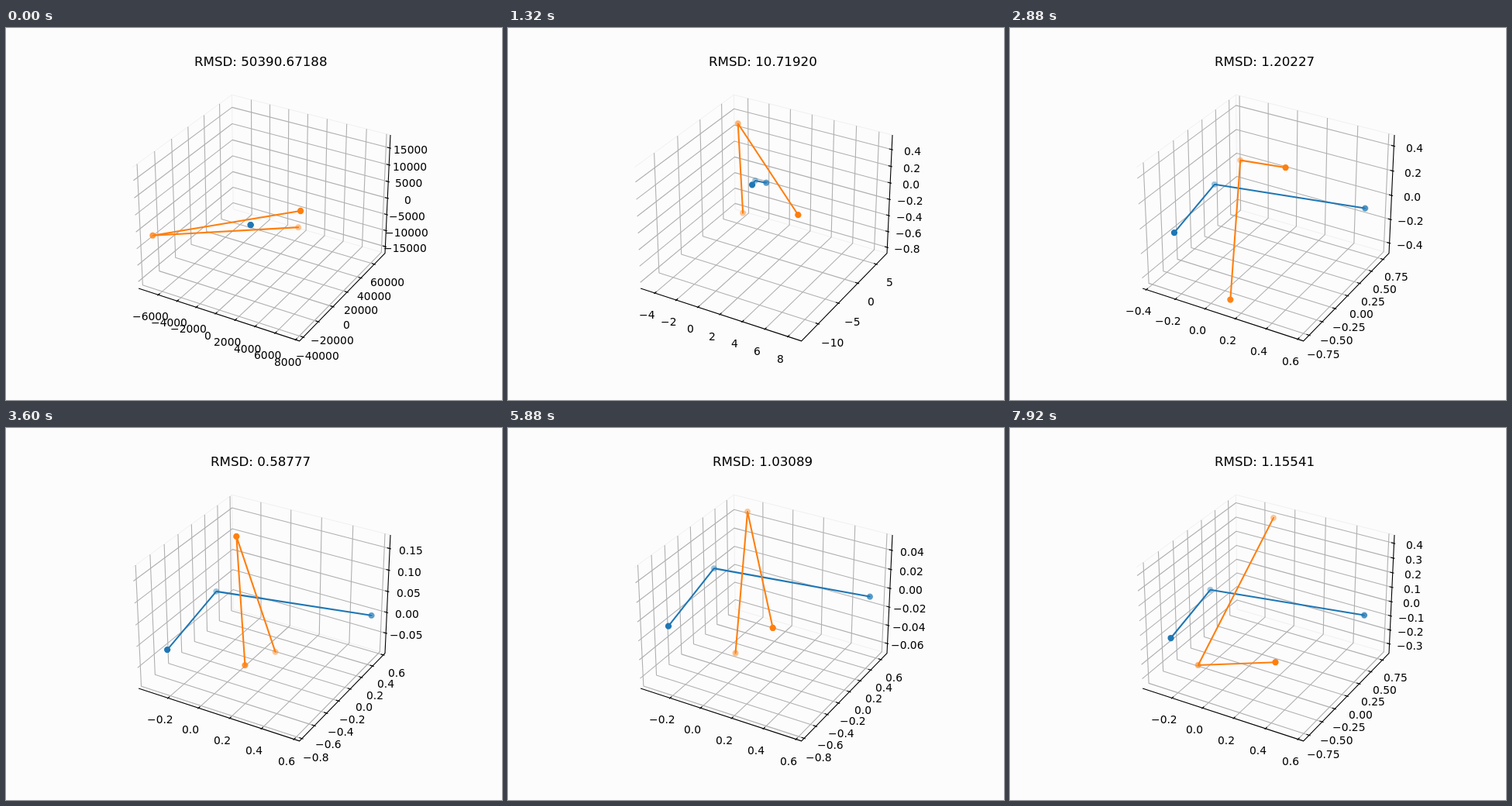
An HTML page with a canvas for the animation above (8000 ms loop, 640 by 480 pixels).

```html
<!DOCTYPE html>
<html lang="en">
<head>
<meta charset="utf-8">
<title>RMSD</title>
<style>
  html, body { margin: 0; width: 100%; height: 100%; overflow: hidden; background: #fcfcfc; }
  canvas { display: block; }
</style>
</head>
<body>
<canvas id="stage" width="640" height="480"></canvas>
<script>
const ctx = document.getElementById('stage').getContext('2d');
const FONT = '"DejaVu Sans", sans-serif';
const STEP_MS = 120, LOOP_MS = 8000;
const BLUE = '#1f77b4', ORANGE = '#ff7f0e', GRID = '#b0b0b0', EDGE = '#f0f0f0';
const THIN = 1.11, THICK = 2.083;

// Half sizes of the plot box, and the part of them that the data fills.
const HALF = [0.595238, 0.595238, 0.446429];
const [HX, HY, HZ] = HALF;
const MARGIN = 1.1;
const DATA_SHARE = 24 / 25 / MARGIN;

const AXES = [0, 1, 2];
const minus = (p, q) => p.map((v, i) => v - q[i]);
const extent = values => Math.max(...values.map(Math.abs));
const geometricMix = (a, b, f) => a ** (1 - f) * b ** f;

// Atoms are centred on the origin, so two of them give the third.
const centred = (first, middle) => [first, middle, minus(minus([0, 0, 0], first), middle)];

// Water: two bonds of 0.957 at 104.5 degrees, seen from the middle atom.
function water(direction) {
  const bond = degrees => {
    const a = degrees * Math.PI / 180;
    return [0.957 * Math.cos(a), 0.957 * Math.sin(a), -0.0065];
  };
  const left = bond(direction), right = bond(direction + 104.5);
  const middle = left.map((v, i) => -(v + right[i]) / 3);
  return centred(middle.map((v, i) => v + left[i]), middle);
}
const reference = water(-84.4);

// Key poses of the fitted molecule.
const pose = (step, rmsd, first, middle) => ({ step, rmsd, atoms: centred(first, middle) });
const poses = [
  pose(0, 50390.67188, [7328, -31500, 16510], [-7057, -37100, -1689]),
  pose(11, 10.7192, [-3.82, 6.05, -0.783], [-4.42, 6.55, 0.304]),
  pose(18, 2.4592, [0.349, -1.251, 0.54], [-0.856, 2.856, -1.108]),
  pose(30, 0.58777, [0.0355, -0.2075, -0.0817], [-0.1495, 0.1145, 0.163]),
  pose(38, 0.87731, [-0.1065, -0.025, -0.376], [-0.323, 0.1575, 0.275]),
  pose(49, 1.03089, [-0.089, -0.05, -0.0628], [-0.265, 0.622, 0.0477]),
  pose(66, 1.15541, [-0.1046, 0.785, 0.403], [-0.2154, -0.348, -0.3155])
];

// On each axis the shape blends linearly while its extent changes geometrically.
function mixAtoms(from, to, f) {
  const columns = AXES.map(axis => {
    const a = from.map(p => p[axis]), b = to.map(p => p[axis]);
    const shape = a.map((v, i) => v / extent(a) * (1 - f) + b[i] / extent(b) * f);
    const scale = geometricMix(extent(a), extent(b), f) / extent(shape);
    return shape.map(v => v * scale);
  });
  return from.map((_, i) => columns.map(column => column[i]));
}

function stateAt(step) {
  const next = Math.max(1, poses.findIndex(p => p.step >= step));
  const a = poses[next - 1], b = poses[next];
  const f = (step - a.step) / (b.step - a.step);
  return { rmsd: geometricMix(a.rmsd, b.rmsd, f), atoms: mixAtoms(a.atoms, b.atoms, f) };
}

// Perspective view: elevation 30 degrees, azimuth -60 degrees, distance 10.
const S = Math.sqrt(3);
function project([x, y, z]) {
  const depth = 10 - S / 4 * x + 0.75 * y - z / 2;
  const scale = 1997.84 / depth;
  return {
    x: 333 + scale * (S / 2 * x + y / 2),
    y: 237.4 - scale * (-x / 4 + S / 4 * y + S / 2 * z),
    depth
  };
}

function polyline(points, color, width) {
  ctx.beginPath();
  points.map(project).forEach(p => ctx.lineTo(p.x, p.y));
  ctx.strokeStyle = color;
  ctx.lineWidth = width;
  ctx.stroke();
}

// Limits follow the data; ticks use the smallest round step giving at most 8 intervals.
function makeAxis(values, half) {
  const min = Math.min(...values), max = Math.max(...values);
  const center = (min + max) / 2, reach = (max - min) / 2;
  const toBox = v => (v - center) / reach * half * DATA_SHARE;
  const low = center - reach * MARGIN, high = center + reach * MARGIN;
  const raw = (high - low) / 8, power = 10 ** Math.floor(Math.log10(raw));
  const step = [1, 2, 2.5, 5, 10].find(s => s * power >= raw) * power;
  const decimals = (String(+step.toPrecision(3)).split('.')[1] || '').length;
  const ticks = [];
  for (let i = Math.ceil(low / step); i * step <= high; i++) {
    const label = (i < 0 ? '\u2212' : '') + Math.abs(i * step).toFixed(decimals);
    ticks.push({ at: toBox(i * step), label });
  }
  return { toBox, ticks };
}

// A point beside each axis: v along it, d outwards in the tick direction.
const besideAxis = [
  (v, d) => [v, -HY - d, -HZ],
  (v, d) => [HX + d, v, -HZ],
  (v, d) => [HX + d, HY, v]
];
const gridLine = [
  v => [[v, -HY, -HZ], [v, HY, -HZ], [v, HY, HZ]],
  v => [[HX, v, -HZ], [-HX, v, -HZ], [-HX, v, HZ]],
  v => [[HX, HY, v], [-HX, HY, v], [-HX, -HY, v]]
];
const TICK = 0.00952, PAD = 0.0988;

function labelPoint(axis, v) {
  const [x, y, z] = besideAxis[axis](v, PAD);
  return axis === 2 ? [x, y + PAD, z] : [x, y, z - PAD * 0.75];
}

function text(str, x, baseline, size) {
  ctx.font = `${size}px ${FONT}`;
  ctx.fillStyle = '#000';
  ctx.fillText(str, Math.round(x + 0.5 - ctx.measureText(str).width / 2), Math.round(baseline));
}

function drawBox(axes) {
  polyline([[-HX, -HY, HZ], [-HX, HY, HZ], [HX, HY, HZ]], EDGE, 1);
  polyline([[-HX, HY, HZ], [-HX, HY, -HZ], [HX, HY, -HZ]], EDGE, 1);
  axes.forEach(({ ticks }, i) => ticks.forEach(t => polyline(gridLine[i](t.at), GRID, THIN)));
  polyline([[-HX, -HY, -HZ], [HX, -HY, -HZ], [HX, HY, -HZ], [HX, HY, HZ]], '#000', THIN);
  axes.forEach(({ ticks }, i) => ticks.forEach(({ at, label }) => {
    polyline([besideAxis[i](at, -2 * TICK), besideAxis[i](at, TICK)], '#000', THIN);
    const p = project(labelPoint(i, at));
    text(label, p.x, p.y + 10.6, 13.889);
  }));
}

// Farther atoms are more transparent.
function drawAtoms(points, color) {
  const dots = points.map(project).sort((a, b) => b.depth - a.depth);
  const far = dots[0].depth, near = dots[2].depth;
  ctx.fillStyle = ctx.strokeStyle = color;
  ctx.lineWidth = THICK;
  dots.forEach(p => {
    ctx.globalAlpha = 1 - 0.7 * (1 / near - 1 / p.depth) / (1 / near - 1 / far);
    ctx.beginPath();
    ctx.arc(p.x, p.y, 3.1, 0, 2 * Math.PI);
    ctx.fill();
    ctx.stroke();
  });
  ctx.globalAlpha = 1;
}

function draw(step) {
  const { rmsd, atoms } = stateAt(step);
  const axes = AXES.map(i => makeAxis([...reference, ...atoms].map(p => p[i]), HALF[i]));
  const toBox = p => p.map((v, i) => axes[i].toBox(v));
  const molecules = [[reference.map(toBox), BLUE], [atoms.map(toBox), ORANGE]];

  ctx.fillStyle = '#fcfcfc';
  ctx.fillRect(0, 0, 640, 480);
  ctx.lineJoin = 'round';
  ctx.lineCap = 'butt';
  drawBox(axes);
  ctx.lineCap = 'square';
  molecules.forEach(([points, color]) => polyline(points, color, THICK));
  molecules.forEach(([points, color]) => drawAtoms(points, color));
  text(`RMSD: ${rmsd.toFixed(5)}`, 328.5, 49.3, 16.667);
}

const start = performance.now();
function frame() {
  draw(Math.floor((performance.now() - start) % LOOP_MS / STEP_MS));
  requestAnimationFrame(frame);
}
frame();
</script>
</body>
</html>
```
